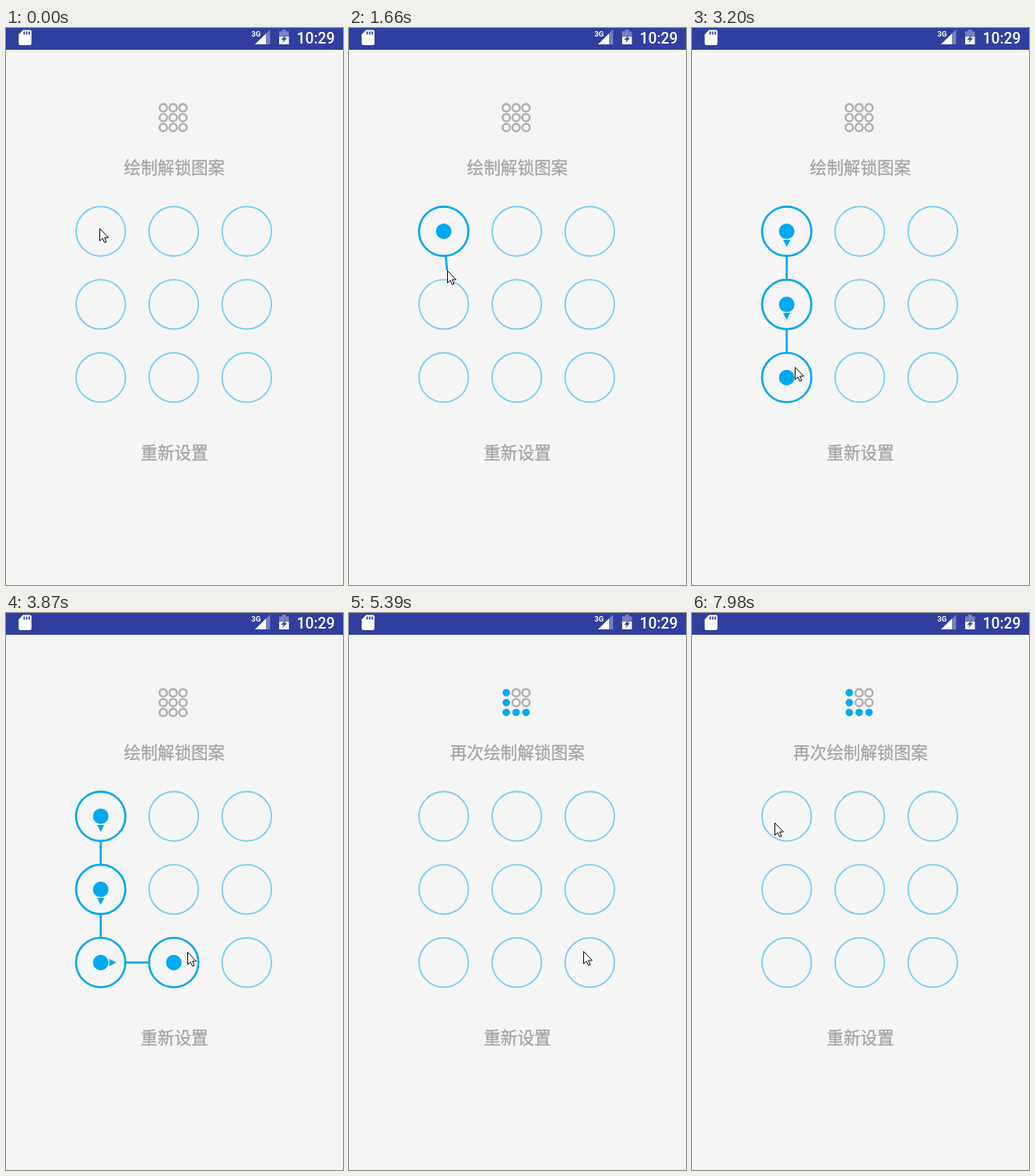
An HTML page that plays this animation: 433 px wide and 715 px high, repeating every 8 s.

```html
<!DOCTYPE html>
<html lang="zh-CN">
<head>
<meta charset="utf-8">
<title>Pattern lock</title>
<style>
  html, body { margin: 0; width: 100%; height: 100%; overflow: hidden; background: #f5f5f5; }
  svg { display: block; width: 100%; height: 100%; }
  .label { font: 21.6px "Noto Sans CJK SC", "Noto Sans CJK", sans-serif; fill: #a5a5a5; stroke: #a5a5a5; stroke-width: .3; text-anchor: middle; }
  .status { font-family: Roboto, sans-serif; font-weight: 500; fill: #fff; }
  .idle { fill: none; stroke: #7bd0f5; stroke-width: 1.9; }
  .active { fill: none; stroke: #00a9f0; stroke-width: 2.7; }
  .solid { fill: #00a9f0; }
  .hint { fill: none; stroke: #b2b0b1; stroke-width: 2.6; }
</style>
</head>
<body>
<svg viewBox="0 0 433 715">
  <rect width="433" height="715" fill="#f5f5f5"/>
  <rect width="433" height="28" fill="#303f9f"/>
  <g fill="#fff">
    <path d="M22 2.5H30.7Q32.7 2.5 32.7 4.5V20Q32.7 22 30.7 22H18.3Q16.3 22 16.3 20V8.2Z"/>
    <path d="M23.4 4.5v4M26.6 4.5v4M29.8 4.5v4" stroke="#303f9f" stroke-width="1.8"/>
    <path d="M320 21L339.3 2V21Z" opacity=".35"/>
    <path d="M320 21L334 7.2V21Z"/>
    <path d="M351 4.2H354.8V2H359.6V4.2H363.4V21H351Z" opacity=".35"/>
    <path d="M351 11.3H363.4V21H351Z"/>
    <path d="M359.8 8.5L353.4 15.2H356.8L354.8 19.5L361.2 12.8H357.8Z" fill="#303f9f"/>
  </g>
  <text class="status" x="315.3" y="10.8" font-size="9.6" style="font-weight:700">3G</text>
  <text class="status" x="373.6" y="20" font-size="19.3">10:29</text>
  <g id="hints"></g>
  <text class="label" id="title" x="216.4" y="187"></text>
  <text class="label" x="216.4" y="553">重新设置</text>
  <g id="pad"></g>
  <path id="cursor" d="M.5 .5V16.2L4.1 12.9L6.6 18.4L9 17.4L6.6 12H11.5Z" fill="#fff" stroke="#000" stroke-width="1"/>
</svg>
<script>
const LOOP = 8000, FIRST_BEAT = 425, BEAT = 137;
const PRESS = 1, RELEASE = 36;
const RADIUS = 31.7, TOUCH_RADIUS = 34;

// Pointer moves, timed in beats; it rests in between
const START = { x: 120, y: 257 };
const MOVES = [
  { from: 2, to: 5, x: 120, y: 268 },
  { from: 5, to: 9, x: 126, y: 311 },
  { from: 11, to: 15, x: 128, y: 370 },
  { from: 16, to: 20, x: 132, y: 435 },
  { from: 22, to: 25, x: 233, y: 435 },
  { from: 25, to: 28, x: 282, y: 430 },
  { from: 28, to: 31, x: 301, y: 434 },
  { from: 48, to: 51, x: 159, y: 381 },
  { from: 51, to: 52, x: 95, y: 270 },
  { from: 54, to: 55, x: 106, y: 269 }
];

const byId = id => document.getElementById(id);
const clamp01 = v => Math.min(1, Math.max(0, v));
const easeOut = v => 1 - (1 - v) ** 1.3;
const distance = (a, b) => Math.hypot(b.x - a.x, b.y - a.y);
const grid = (x, y, gap) => Array.from({ length: 9 }, (_, i) =>
  ({ x: x + i % 3 * gap, y: y + Math.floor(i / 3) * gap }));

const dots = grid(121.7, 261, 93.85);
const hintDots = grid(202.1, 102.4, 12.65);

function pointerAt(beat) {
  return MOVES.reduce((p, move) => {
    const k = easeOut(clamp01((beat - move.from) / (move.to - move.from)));
    return { x: Math.round(p.x + (move.x - p.x) * k), y: Math.round(p.y + (move.y - p.y) * k) };
  }, START);
}

// Dots touched so far, in order; a touch shows one beat late
function chainAt(beat) {
  const chain = new Set();
  for (let b = PRESS; b < beat; b++) {
    const dot = dots.find(d => distance(d, pointerAt(b)) < TOUCH_RADIUS);
    if (dot) chain.add(dot);
  }
  return [...chain];
}

const pattern = chainAt(RELEASE).map(dot => dots.indexOf(dot));

const circle = (p, r, cls) => `<circle class="${cls}" cx="${p.x}" cy="${p.y}" r="${r}"/>`;

// Line from the rim of one dot to a point, stopping short by `gap`
function link(from, to, gap) {
  const length = distance(from, to);
  if (length <= RADIUS + gap) return '';
  const along = d => `${from.x + (to.x - from.x) * d / length} ${from.y + (to.y - from.y) * d / length}`;
  return `<path class="active" d="M${along(RADIUS)}L${along(length - gap)}"/>`;
}

function arrow(from, to) {
  const angle = Math.atan2(to.y - from.y, to.x - from.x) * 180 / Math.PI;
  return `<path class="solid" d="M11 -4.7L20 0L11 4.7Z" transform="translate(${from.x} ${from.y}) rotate(${angle})"/>`;
}

function drawPad(pointer, chain) {
  const rings = dots.map(dot => chain.includes(dot)
    ? circle(dot, RADIUS, 'active') + circle(dot, 10, 'solid')
    : circle(dot, RADIUS, 'idle'));
  const links = chain.map((dot, i) => {
    const next = chain[i + 1];
    return next ? link(dot, next, RADIUS) + arrow(dot, next) : link(dot, pointer, 0);
  });
  byId('pad').innerHTML = rings.concat(links).join('');
}

function drawHeader(confirming) {
  byId('title').textContent = confirming ? '再次绘制解锁图案' : '绘制解锁图案';
  byId('hints').innerHTML = hintDots.map((p, i) =>
    circle(p, 4.8, confirming && pattern.includes(i) ? 'solid' : 'hint')).join('');
}

let shownBeat;
function render(time) {
  const beat = Math.floor((time % LOOP - FIRST_BEAT) / BEAT);
  if (beat === shownBeat) return;
  shownBeat = beat;
  const pointer = pointerAt(beat), released = beat >= RELEASE;
  drawHeader(released);
  drawPad(pointer, released ? [] : chainAt(beat));
  byId('cursor').setAttribute('transform', `translate(${pointer.x} ${pointer.y})`);
}

const origin = performance.now();
function tick() {
  render(performance.now() - origin);
  requestAnimationFrame(tick);
}
tick();
</script>
</body>
</html>
```
